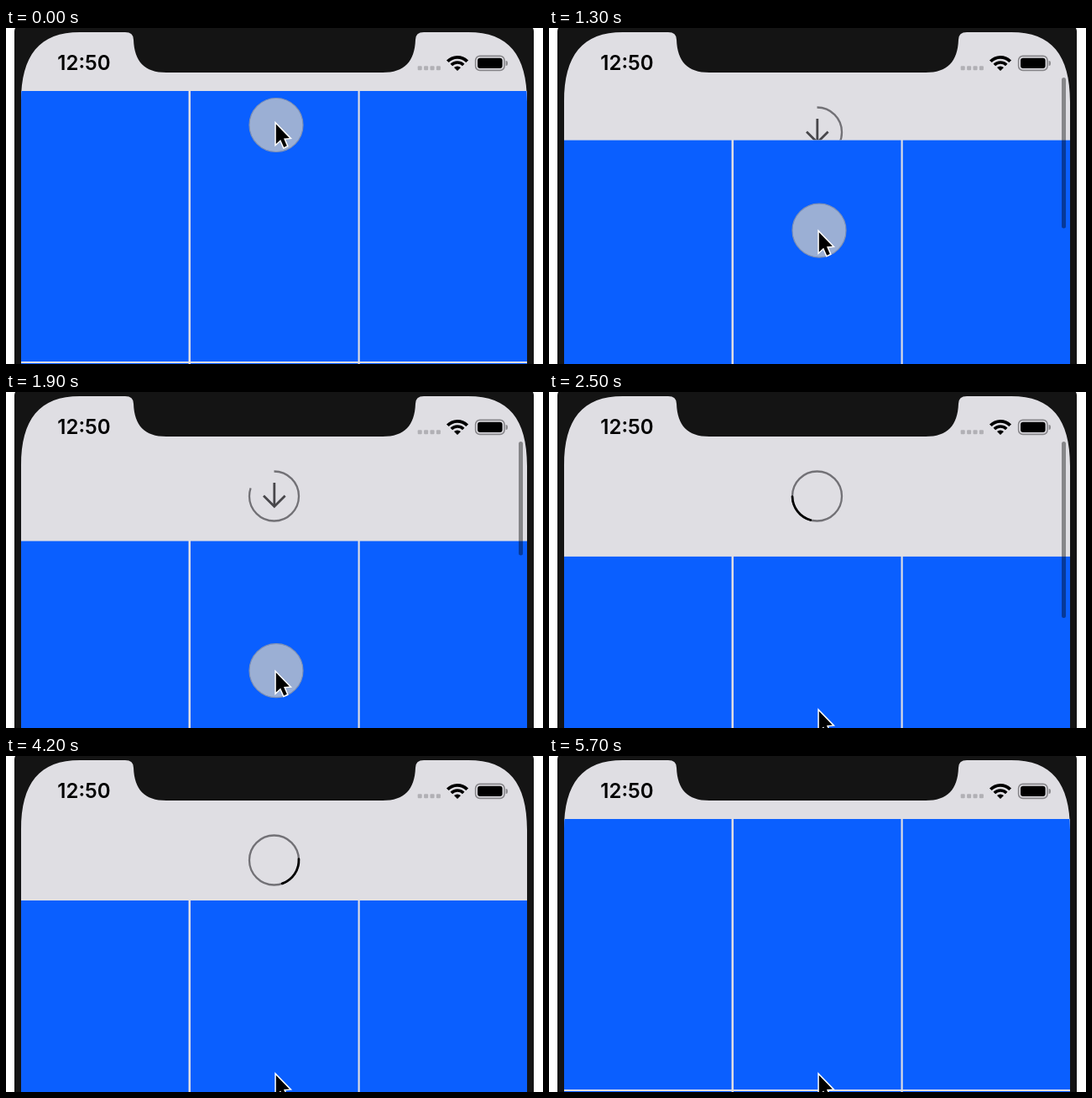
An HTML page with a canvas that plays this animation: 640x400 px, repeating every 5.8 s.

```html
<!DOCTYPE html>
<html lang="en">
<head>
<meta charset="utf-8">
<title>Pull to refresh</title>
<style>
  html, body { margin: 0; width: 100%; height: 100%; overflow: hidden; background: #fff; }
  canvas { position: absolute; left: 0; top: 0; }
  #clock {
    position: absolute; left: 43px; top: 27px; width: 100px; text-align: center;
    font: 600 24px/30px Inter, "Liberation Sans", sans-serif; color: #000;
  }
</style>
</head>
<body>
<canvas id="stage" width="640" height="400"></canvas>
<div id="clock">12:50</div>
<script>
const c = document.getElementById('stage').getContext('2d');
const LOOP = 5800, STEP = 100;
const REFRESH = 2300, RELEASE = 2450, DONE = 4960, CLOSE = 600;
const TOP = 75, INSET = 97, TAU = Math.PI * 2;
const BG = '#dfdee3', BLUE = '#0a5fff', BEZEL = '#141414';

const clamp = (v, a = 0, b = 1) => Math.min(b, Math.max(a, v));
const smooth = k => k * k * (3 - 2 * k);

// Smooth curve through [time, value] points, at rest at both ends
function track(pts, t) {
  const n = pts.length - 1;
  if (t <= pts[0][0]) return pts[0][1];
  if (t >= pts[n][0]) return pts[n][1];
  const i = pts.findIndex(p => p[0] > t) - 1;
  const slope = j => j === 0 || j === n ? 0
    : (pts[j + 1][1] - pts[j - 1][1]) / (pts[j + 1][0] - pts[j - 1][0]);
  const [t0, a] = pts[i], [t1, b] = pts[i + 1];
  const d = t1 - t0, u = (t - t0) / d, s = smooth(u);
  return a + (b - a) * s + d * u * (1 - u) * (slope(i) * (1 - u) - slope(i + 1) * u);
}

const touchY = t => track([[100, 115.5], [900, 186], [1600, 284.5], [2350, 378]], t);
const pointerY = t => track([[100, 113], [900, 186], [1600, 285.5], [2350, 378.5]], t);

function rubber(t) {
  const x = Math.max(0, touchY(t) - 115.5 - 14) * 0.55;
  return x / (1 + x / 1306);
}

function pullAt(t) {
  if (t < RELEASE) return rubber(t);
  if (t < DONE) {
    const w = (t - RELEASE) * 0.011;
    return INSET + (rubber(RELEASE) - INSET) * (1 + w) * Math.exp(-w);
  }
  return INSET * (1 - smooth(clamp((t - DONE) / CLOSE)));
}

function line(pts, color, width) {
  c.beginPath();
  pts.forEach(([x, y]) => c.lineTo(x, y));
  c.strokeStyle = color;
  c.lineWidth = width;
  c.stroke();
}

// Angles in turns, clockwise from the top
function arc(x, y, r, from, to, color, width) {
  c.beginPath();
  c.arc(x, y, r, (from - 0.25) * TAU, (to - 0.25) * TAU);
  c.strokeStyle = color;
  c.lineWidth = width;
  c.stroke();
}

function round(x, y, w, h, r, color) {
  c.beginPath();
  c.roundRect(x, y, w, h, r);
  c.fillStyle = color;
  c.fill();
}

function screenPath() {
  c.beginPath();
  c.moveTo(18, 400);
  c.lineTo(18, 88);
  c.bezierCurveTo(18, 32, 40, 5, 88, 5);
  c.lineTo(142, 5);
  c.quadraticCurveTo(152, 5, 152, 14);
  c.bezierCurveTo(153, 40, 165, 53, 191, 53);
  c.lineTo(449, 53);
  c.bezierCurveTo(475, 53, 487, 40, 488, 14);
  c.quadraticCurveTo(488, 5, 498, 5);
  c.lineTo(551, 5);
  c.bezierCurveTo(599, 5, 621, 32, 621, 88);
  c.lineTo(621, 400);
  c.closePath();
}

function indicator(t, pull) {
  const x = 319.5, y = 124, r = 29.5, gray = '#727176';
  const busy = t >= REFRESH && t < DONE;
  c.lineCap = 'butt';
  if (busy) {
    arc(x, y, r, 0, 1, gray, 2.3);
    const a = 0.542 + (t - 2500) / 1000;
    c.lineCap = 'round';
    arc(x, y, r, a, a + 0.205, '#000', 2.7);
    c.lineCap = 'butt';
    return;
  }
  const p = clamp((pull - 15) / 109);
  if (t < REFRESH && p > 0) arc(x, y, r, 0, p, gray, 2.3);
  line([[319.8, 108], [319.8, 136]], '#48474b', 2.8);
  line([[307, 123.5], [319.8, 136.3], [332.6, 123.5]], '#48474b', 2.8);
}

function grid(top) {
  c.fillStyle = BLUE;
  for (const y of [top, top + 324]) {
    for (const x of [18, 220, 421.7]) c.fillRect(x, y, 199.5, 322);
  }
}

function statusIcons() {
  for (let i = 0; i < 4; i++) round(490.7 + i * 7.4, 45.3, 5, 5, 1, '#b1b0b5');
  c.lineCap = 'butt';
  arc(538, 51, 16.2, -0.128, 0.128, '#000', 3.8);
  arc(538, 51, 10, -0.128, 0.128, '#000', 3.6);
  c.beginPath();
  c.moveTo(538, 51);
  c.arc(538, 51, 5.6, -0.378 * TAU, -0.122 * TAU);
  c.fillStyle = '#000';
  c.fill();
  c.beginPath();
  c.roundRect(559.6, 33.4, 34.4, 17, 5);
  c.strokeStyle = '#88878b';
  c.lineWidth = 1.6;
  c.stroke();
  round(562, 35.8, 29.6, 12.2, 3, '#000');
  round(595.6, 39, 2.3, 6, [0, 2, 2, 0], '#88878b');
}

function scrollbar(t, pull) {
  const alpha = t < REFRESH ? clamp(pull / 3) : 1 - clamp((t - 3650) / 300);
  if (alpha <= 0) return;
  const over = t < REFRESH ? pull : pull - INSET;
  round(611, 59, 5, 238 - over - (t < REFRESH ? 0 : 4), 2.5, `rgba(0,0,0,${0.4 * alpha})`);
}

function touch(y) {
  c.beginPath();
  c.arc(322, y, 32, 0, TAU);
  c.fillStyle = 'rgba(197,198,200,.78)';
  c.fill();
  c.strokeStyle = '#7f90b4';
  c.lineWidth = 1.2;
  c.stroke();
}

function pointer(y) {
  c.save();
  c.translate(321.8, y + 1.5);
  c.beginPath();
  [[0, 0], [0, 23.4], [5.4, 18.4], [9.4, 27.4], [13, 25.8], [9.2, 17], [16, 16.4]]
    .forEach(([x, v]) => c.lineTo(x, v));
  c.closePath();
  c.lineJoin = 'miter';
  c.miterLimit = 3;
  c.strokeStyle = '#fff';
  c.lineWidth = 3;
  c.stroke();
  c.fillStyle = '#000';
  c.fill();
  c.restore();
}

function draw(t) {
  const pull = pullAt(t);
  c.fillStyle = '#fff';
  c.fillRect(0, 0, 640, 400);
  round(10, -4, 619, 420, 8, BEZEL);
  c.save();
  screenPath();
  c.fillStyle = BG;
  c.fill();
  c.clip();
  indicator(t, pull);
  if (pull < 80) {
    c.fillStyle = BG;
    c.fillRect(18, TOP + pull, 603, 400);
  }
  c.fillStyle = BG;
  c.fillRect(18, TOP + pull, 603, 400);
  grid(TOP + pull);
  statusIcons();
  scrollbar(t, pull);
  c.restore();
  if (t < RELEASE) touch(touchY(t));
  pointer(pointerY(t));
}

const start = performance.now();
function tick() {
  const t = (performance.now() - start) % LOOP;
  draw(Math.floor(t / STEP) * STEP);
  requestAnimationFrame(tick);
}
tick();
</script>
</body>
</html>
```
